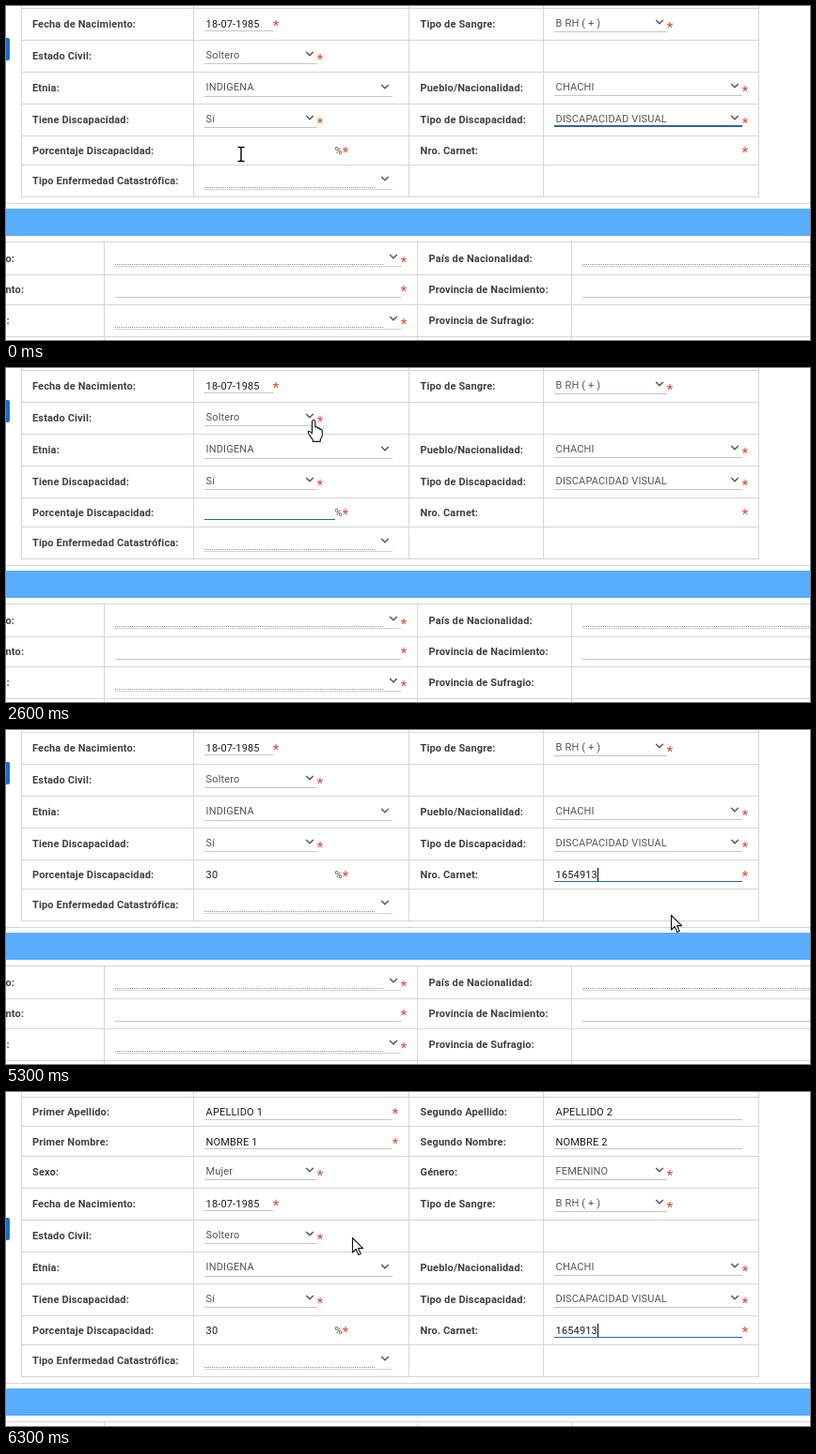
An HTML page that plays this animation: 855x356 px, repeating every 6400 ms.

```html
<!DOCTYPE html>
<html lang="es">
<head>
<meta charset="utf-8">
<title>Formulario</title>
<style>
  html, body { margin: 0; width: 100%; height: 100%; overflow: hidden; background: #fff; }
  svg { display: block; width: 100%; height: 100%; }
  text { font: 11px Roboto, Arial, sans-serif; letter-spacing: .15px; white-space: pre; }
  .label { font-weight: 700; fill: #3f3f3f; }
  .value { fill: #555; }
  .input { fill: #1c1c1c; }
  .star { font-size: 15px; letter-spacing: 0; text-anchor: middle; fill: #e5422c; }
  rect { shape-rendering: crispEdges; }
</style>
</head>
<body>
<svg id="stage" viewBox="0 0 855 356">
  <g id="page"></g>
  <g id="cursor"></g>
</svg>
<script>
const LOOP = 6400, STEP = 100;
const GRID = '#d6d6d6', LINE = '#c6c6c6', FOCUS = '#2465b4';
const page = document.getElementById('page');
const cursor = document.getElementById('cursor');

function set(node, attrs) {
  for (const k in attrs) node.setAttribute(k, attrs[k]);
  return node;
}
function add(parent, tag, attrs) {
  return parent.appendChild(set(document.createElementNS('http://www.w3.org/2000/svg', tag), attrs));
}
const show = (node, on) => set(node, { visibility: on ? 'visible' : 'hidden' });
const box = (x, y, width, height, fill) => add(page, 'rect', { x, y, width, height, fill });

function write(x, y, str, cls) {
  const t = add(page, 'text', { x, y, class: cls });
  t.textContent = str;
  return t;
}
const label = (x, y, str) => write(x, y + 4, str, 'label');
const star = (x, y) => write(x, y + 8, '*', 'star');
const chevron = (x, y) => add(page, 'path', {
  d: `M${x - 3.8} ${y - 2}l3.8 3.8l3.8 -3.8`, fill: 'none', stroke: '#555', 'stroke-width': 1.4
});

// Fields are placed by the centre line y of their row.
function select(x, y, w, str, starred = true, dy = 0) {
  const line = box(x, y + 8 + dy, w, 1, LINE);
  write(x + 1.6, y + 3, str, 'value');
  chevron(x + w - 8, y - 2 + dy);
  if (starred) star(x + w + 3, y + 1);
  return line;
}
function input(x, y, w, str, starred, dy = 8) {
  box(x, y + dy, w, 1, LINE);
  write(x + 1.6, y + 4, str, 'input');
  if (starred) star(x + w + 3, y - 1);
}
function emptySelect(x, y, w, starred, dy = 0) {
  box(x, y + 8 + dy, w, 1, '#d2d2d2');
  add(page, 'path', {
    d: `M${x} ${y + 6.5 + dy}h${w - 19}`, stroke: '#8c8c8c', 'stroke-dasharray': '1 1'
  });
  chevron(x + w - 8, y - 2);
  if (starred) star(x + w + 3, y + 1);
}

// Upper table
for (const y of [-95, -64, -32, 2, 36, 70, 104, 138, 169, 203]) box(16, y, 785, 1, GRID);
for (const x of [16, 199, 428, 571, 800]) box(x, -140, 1, 344, GRID);
[['Primer Apellido:', 'Segundo Apellido:', -79], ['Primer Nombre:', 'Segundo Nombre:', -47],
 ['Sexo:', 'Género:', -15], ['Fecha de Nacimiento:', 'Tipo de Sangre:', 19],
 ['Estado Civil:', '', 53], ['Etnia:', 'Pueblo/Nacionalidad:', 87],
 ['Tiene Discapacidad:', 'Tipo de Discapacidad:', 121],
 ['Porcentaje Discapacidad:', 'Nro. Carnet:', 154], ['Tipo Enfermedad Catastrófica:', '', 186]
].forEach(([left, right, y]) => { label(28, y, left); label(440.5, y, right); });

input(211, -79, 200, 'APELLIDO 1', true);
input(583, -79, 200, 'APELLIDO 2', false);
input(211, -47, 200, 'NOMBRE 1', true, 7);
input(583, -47, 200, 'NOMBRE 2', false, 7);
select(211, -15, 120, 'Mujer');
select(583, -15, 120, 'FEMENINO');
input(211, 19, 73, '18-07-1985', true, 7);
select(583, 19, 120, 'B RH ( + )');
select(211, 53, 120, 'Soltero');
select(211, 87, 200, 'INDIGENA', false, 1);
select(583, 87, 200, 'CHACHI');
select(211, 121, 120, 'Sí');
const kindLine = select(583, 121, 200, 'DISCAPACIDAD VISUAL');
write(349.5, 158, '%', 'value');
star(361, 153);
star(786, 153);
emptySelect(211, 186, 200, false, 1);

// Side tab, section bar and lower table
add(page, 'path', { d: 'M0 34h2q2 0 2 2v20q0 2 -2 2h-2z', fill: '#1070d2' });
box(0, 210, 855, 1, GRID);
box(0, 216, 855, 29, '#58aefc');
for (const y of [251, 286, 318, 352]) box(0, y, 855, 1, GRID);
for (const x of [104, 437, 601]) box(x, 251, 1, 130, GRID);
label(-.5, 269, 'o:');
label(-.5, 302, 'nto:');
label(.5, 335, ':');
label(449.5, 269, 'País de Nacionalidad:');
label(449.5, 302, 'Provincia de Nacimiento:');
label(449.5, 335, 'Provincia de Sufragio:');
emptySelect(116, 269, 304, true);
emptySelect(116, 335, 304, true, 1);
emptySelect(613, 269, 300, false);
input(116, 302, 304, '', true);
input(613, 302, 300, '', false);

// Fields that are typed into
function typed(x, w) {
  return { x, line: box(x, 161, w, 1, FOCUS), text: write(x + 1.6, 158, '', 'input'), caret: box(0, 147, 1, 14, '#000') };
}
const percent = typed(211, 139), card = typed(583, 200);

function update(field, str, focused, caretOn) {
  field.text.textContent = str;
  show(field.line, focused);
  show(field.caret, focused && caretOn);
  const end = str ? field.text.getComputedTextLength() : 0;
  set(field.caret, { x: Math.round(field.x + 1.4 + end) });
}

// Pointer shapes, hot spot at 0,0
const outline = { fill: '#fff', stroke: '#111', 'stroke-width': 1.1, 'stroke-linejoin': 'round' };
const shapes = {
  beam: add(cursor, 'path', {
    d: 'M-3.5 -7.5h2.5l1 1l1 -1h2.5M0 -6.5v13M-3.5 7.5h2.5l1 -1l1 1h2.5',
    fill: 'none', stroke: '#000', 'stroke-width': 1.4
  }),
  arrow: add(cursor, 'path', { d: 'M.5 .5v15.5l3.7 -3.5l2.6 6l2.4 -1l-2.6 -5.9h5z', ...outline }),
  hand: add(cursor, 'path', {
    d: 'M-1.5 1.3q0 -1.8 1.7 -1.8t1.7 1.8v6q1 -1 2.5 0v1q1.3 -1 2.5 .3v1q1.8 -.6 2.4 1v5q0 2.5 -2 4.4v2.4h-8v-2q-2.500 -2.700 -4.200 -6q-1.500 -2.700 0 -3.200q1.300 -.2 3.400 2.600z',
    ...outline
  })
};

// time, x, y, shape
const track = [
  [0, 250, 158, 'beam'], [100, 250, 158, 'beam'], [700, 283, 158, 'beam'], [1300, 335, 158, 'beam'],
  [1600, 335, 158, 'beam'], [1800, 334, 134, 'arrow'], [2000, 334, 126, 'hand'], [2300, 327, 56, 'hand'],
  [3300, 327, 56, 'hand'], [3400, 372, 76, 'arrow'], [3700, 606, 177, 'arrow'], [3900, 605, 158, 'beam'],
  [4200, 600, 160, 'beam'], [4300, 582, 179, 'arrow'], [4500, 668, 181, 'arrow'], [4600, 707, 197, 'arrow'],
  [5700, 707, 197, 'arrow'], [5800, 880, 160, 'arrow'], [6000, 880, 160, 'arrow'], [6300, 368, 155, 'arrow']
];

function movePointer(t) {
  let i = track.length - 1;
  while (track[i][0] > t) i--;
  const a = track[i], b = track[i + 1] || a;
  const k = b === a ? 0 : (t - a[0]) / (b[0] - a[0]);
  set(cursor, { transform: `translate(${Math.round(a[1] + (b[1] - a[1]) * k)} ${Math.round(a[2] + (b[2] - a[2]) * k)})` });
  for (const name in shapes) show(shapes[name], name === a[3]);
}

const keys = [100, 2700, 2900, 4000, 4900, 5000, 5100, 5200, 5300];

function draw(time) {
  const t = Math.floor(time % LOOP / STEP) * STEP;
  const lastKey = keys.filter(k => k <= t).pop() || 0;
  const caretOn = Math.floor((t - lastKey) / 500) % 2 === 0;
  const digits = Math.max(0, Math.min(7, Math.round((t - 4800) / 500 * 7)));

  update(percent, '30'.slice(0, t >= 2900 ? 2 : t >= 2700 ? 1 : 0), t >= 100 && t < 4000, caretOn);
  update(card, '1654913'.slice(0, digits), t >= 4000, caretOn);
  set(kindLine, t < 100 ? { y: 127, height: 2, fill: FOCUS } : { y: 129, height: 1, fill: LINE });

  const scroll = t < 5800 ? 0 : t < 5900 ? 37 : t < 6000 ? 99 : 100;
  set(page, { transform: `translate(0 ${scroll})` });
  movePointer(t);
}

const start = performance.now();
function tick() {
  draw(performance.now() - start);
  requestAnimationFrame(tick);
}
tick();
</script>
</body>
</html>
```
